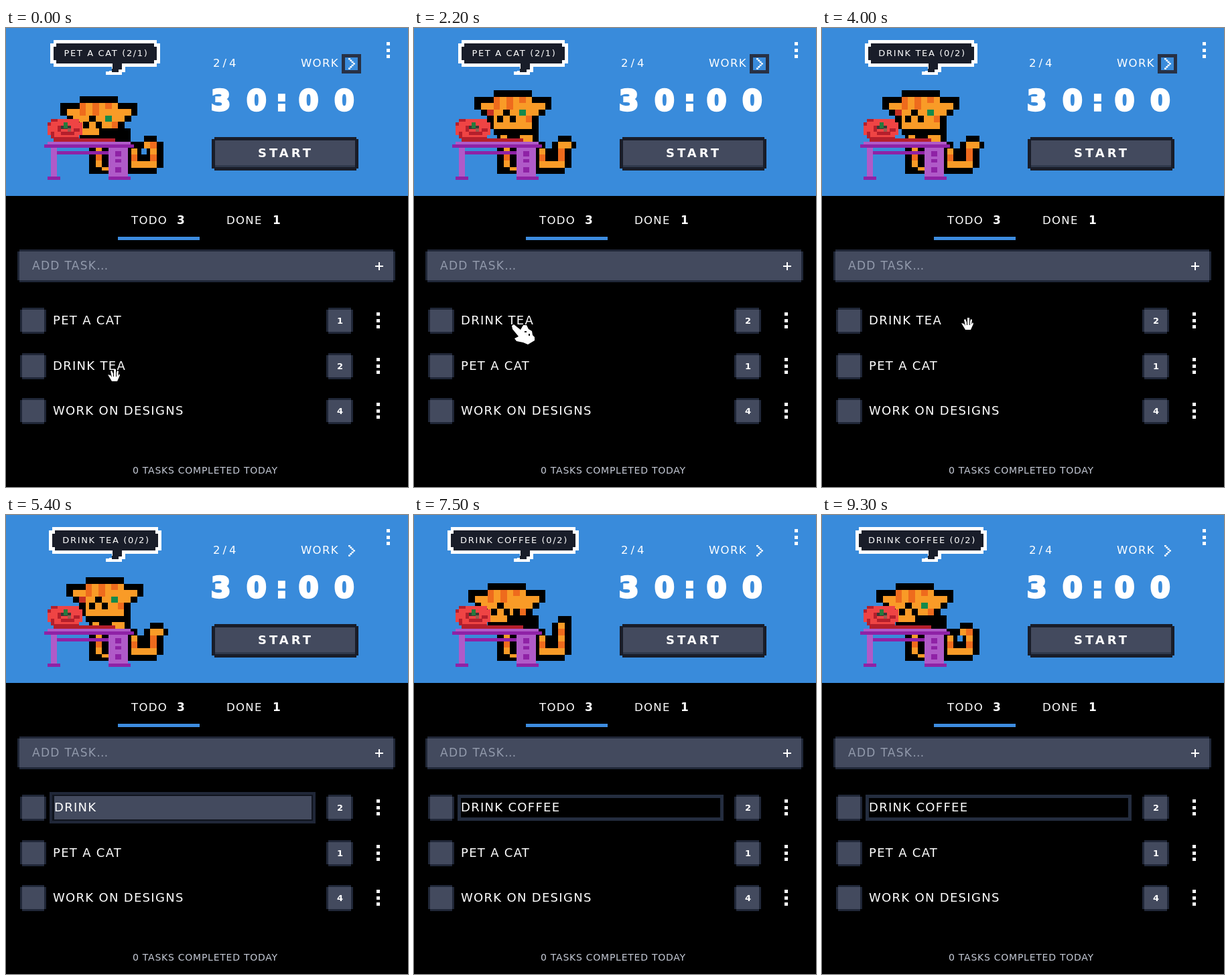
Write an HTML page with a canvas that moves like this. It is 600 px wide and 686 px high and loops after 9.4 s.

```html
<!DOCTYPE html>
<html lang="en">
<head>
<meta charset="utf-8">
<title>Pixel cat timer</title>
<style>
html, body { margin: 0; width: 100%; height: 100%; overflow: hidden; background: #000; }
canvas { display: block; }
</style>
</head>
<body>
<canvas id="stage" width="600" height="686"></canvas>
<script>
const ctx = document.getElementById('stage').getContext('2d');
const LOOP = 9400, STEP = 100;
const BLUE = '#398bdb', SLATE = '#434a5e', EDGE = '#202738', INK = '#191d29', WHITE = '#fff';
const ORANGE = '#f99b27', RUST = '#ee6b1d', RED = '#ef4444', DARK_RED = '#b51f2c';
const PURPLE = '#b05ac8', PLUM = '#8f22a6';
const ROWS = [437, 505, 572];

function box(color, x, y, w, h) {
  ctx.fillStyle = color;
  ctx.fillRect(x, y, w, h);
}

function text(str, x, baseline, { size = 18, gap = 1.3, color = WHITE, bold = false, align = 'left', outline = 0 } = {}) {
  ctx.font = `${bold ? 'bold ' : ''}${size}px "DejaVu Sans", sans-serif`;
  ctx.letterSpacing = gap + 'px';
  ctx.textAlign = align;
  ctx.fillStyle = ctx.strokeStyle = color;
  ctx.fillText(str, x, baseline);
  if (!outline) return;
  ctx.lineWidth = outline;
  ctx.strokeText(str, x, baseline);
}

function shape(color, points) {
  ctx.fillStyle = color;
  ctx.beginPath();
  points.forEach(([x, y]) => ctx.lineTo(x, y));
  ctx.fill();
}

const clamp = v => Math.min(1, Math.max(0, v));
const smooth = v => v * v * (3 - 2 * v);

// Reads a value from [time, value] keys with linear steps between them.
function track(keys, t) {
  const i = keys.findIndex(key => key[0] > t);
  if (i < 0) return keys[keys.length - 1][1];
  if (i === 0) return keys[0][1];
  const [t0, a] = keys[i - 1], [t1, b] = keys[i];
  return a + (b - a) * (t - t0) / (t1 - t0);
}

// Panel with notched pixel corners.
function panel(x, y, w, h, rim = 3) {
  box(EDGE, x + rim, y, w - 2 * rim, h);
  box(EDGE, x, y + rim, w, h - 2 * rim);
  box(SLATE, x + rim, y + rim, w - 2 * rim, h - 2 * rim);
}

function dots(x, y) {
  for (let i = 0; i < 3; i++) box(WHITE, x, Math.round(y + i * 9.5), 5, 5);
}

function bubble(t) {
  const [label, left] = t < 2400 ? ['PET A CAT (2/1)', 66]
    : t < 7000 ? ['DRINK TEA (0/2)', 64] : ['DRINK COFFEE (0/2)', 50];
  const w = 296 - 2 * left;
  box(WHITE, left + 5, 18, w - 10, 40);
  box(WHITE, left, 23, w, 30);
  box(WHITE, 154, 57, 24, 9);
  box(WHITE, 149, 65, 24, 5);
  box(INK, left + 9, 23, w - 18, 30);
  box(INK, left + 5, 28, w - 10, 20);
  box(BLUE, 153, 58, 5, 6);
  box(INK, 159, 53, 14, 9);
  box(INK, 158, 61, 10, 5);
  text(label, 149.5, 42, { size: 13, gap: 1.65, align: 'center' });
}

// Cat cells are placed on a 9.6 px grid.
function cells(color, x, y, col, row, w = 1, h = 1) {
  const u = 9.6, px = v => Math.round(v * u);
  box(color, x + px(col), y + px(row), px(col + w) - px(col), px(row + h) - px(row));
}

function tail(pose) {
  const cell = (color, ...at) => cells(color, 177, 151, ...at);
  // Haunch behind the desk.
  cell('#000', 0, 2, 2, 5);
  cell('#000', 2, 3, 1, 4);
  cell(ORANGE, 1, 3, 1, 3);
  cell(RUST, 1, 4);
  cell('#000', 2, 6, 3);
  if (pose === 'curl') {
    cell('#000', 3, 1, 2);
    cell('#000', 2, 2, 4, 4);
    cell(BLUE, 2.6, 3, 0.8);
    cell(ORANGE, 3, 2);
    cell(RUST, 4, 2);
    cell(ORANGE, 4, 3, 1, 3);
  } else {
    const top = pose === 'up' ? 0 : 1;
    cell('#000', 4, top, 2, 6 - top);
    cell('#000', 3, top + 1, 1, 5 - top);
    cell(ORANGE, 4, top + 1, 1, 5 - top);
    if (pose === 'bend') {
      cell('#000', 5, 2, 1.8);
      cell(ORANGE, 5, 2);
    }
    cell(RUST, 4, top + 2);
  }
  cell(RUST, 4, 4);
  cell(ORANGE, 2, 5, 2);
}

function body(awake) {
  box('#000', 124, 150, 62, 68);
  box(ORANGE, 134, 179, 9, 29);
  box(RUST, 134, 189, 9, 9);
  box(ORANGE, 143, 208, 11, 5);
  if (!awake) return;
  box(ORANGE, 129, 160, 10, 10);
  box(ORANGE, 158, 160, 19, 10);
  box(RUST, 139, 165, 19, 5);
}

function head(awake, blink) {
  const x = awake ? 90 : 81, y = awake ? 93 : 102;
  const cell = (color, ...at) => cells(color, x, y, ...at);
  cell('#000', 3, 0, 6);
  cell('#000', 0, 1, 12, 2);
  cell('#000', 1, 3, 10);
  cell('#000', 2, 4, 8, 2);
  cell('#000', 3, 6, 7);
  cell(ORANGE, 3, 1, 6);
  cell(ORANGE, 1, 2, 10);
  cell(ORANGE, 2, 3, 8);
  cell(ORANGE, 3, 4, 6);
  cell(ORANGE, 3, 5, awake ? 6 : 3);
  cell(RUST, 3, 1);
  cell(RUST, 5, 1);
  cell(RUST, 7, 1);
  cell(RUST, 3, 2);
  cell(RUST, 5, 2);
  cell(RUST, 8, 4);
  cell(awake ? '#c63123' : ORANGE, 2, 3);
  cell(blink ? ORANGE : '#148a4c', 7, 3);
  if (blink) cell('#000', 7, 4);
  cell('#000', 4.5, 3);
  cell('#000', 3.5, 4);
  cell('#000', 5.5, 4);
}

function desk() {
  box(DARK_RED, 71, 165, 92, 5);
  box(PURPLE, 62, 170, 124, 5);
  box(PLUM, 57, 174, 134, 5);
  box(PLUM, 76, 184, 78, 5);
  box(PURPLE, 67, 179, 9, 43);
  box(PLUM, 62, 222, 19, 5);
  box(PURPLE, 153, 179, 29, 43);
  box(PLUM, 153, 222, 33, 5);
  [184, 196, 208].forEach((y, i) => box(PLUM, 163, y, 9, i === 1 ? 5 : 8));
}

function tomato() {
  box(RED, 67, 136, 42, 29);
  box(RED, 62, 141, 52, 19);
  box(DARK_RED, 62, 141, 5, 5);
  box(DARK_RED, 67, 136, 10, 4);
  box(DARK_RED, 67, 155, 5, 10);
  box(DARK_RED, 72, 163, 37, 3);
  box(DARK_RED, 77, 146, 5, 9);
  box(DARK_RED, 82, 155, 20, 5);
  box(DARK_RED, 101, 150, 9, 5);
  box('#3c3834', 82, 146, 15, 5);
  box('#28793d', 86, 141, 6, 9);
  box('#9c5a4e', 92, 150, 5, 5);
}

function cat(t) {
  const awake = t >= 1700 && t < 6500;
  const pose = t < 500 || t >= 8400 ? 'curl' : t < 900 || t >= 6900 ? 'up' : 'bend';
  tail(pose);
  body(awake);
  head(awake, t >= 7200 && t < 7700);
  desk();
  tomato();
}

function timer(t) {
  text('2/4', 309, 58, { size: 16.5, gap: 4 });
  text('WORK', 440, 58, { size: 16.5 });
  if (t < 4600) {
    box('#283145', 501, 39, 29, 29);
    box(BLUE, 506, 44, 19, 19);
  }
  for (let i = 0; i < 7; i++) {
    box(WHITE, 511 + 2.3 * (3 - Math.abs(3 - i)), 45 + i * 2.4, 3, 2.4);
  }
  const digits = { size: 42, gap: 24, bold: true, outline: 3.5 };
  text('30', 306, 123, digits);
  text(':', 403, 123, digits);
  text('00', 437, 123, digits);
  box(INK, 311, 163, 212, 50);
  box(INK, 307, 166, 219, 44);
  box(SLATE, 312, 168, 209, 40);
  box('#30394c', 312, 205, 209, 3);
  text('START', 376, 193, { gap: 4, bold: true });
  dots(568, 21);
}

function tabs() {
  text('TODO', 187, 293, { size: 16.5 });
  text('3', 255, 293, { size: 17, bold: true });
  text('DONE', 329, 293, { size: 16.5 });
  text('1', 398, 293, { size: 17, bold: true });
  box('#3d8ce0', 167, 312, 122, 5);
}

function addField() {
  panel(17, 331, 564, 49);
  text('ADD TASK…', 39, 361, { size: 17, color: '#929aac' });
  box(WHITE, 551, 355, 12, 2);
  box(WHITE, 556, 350, 2, 12);
}

function task(label, count, y, dx = 0) {
  y = Math.round(y);
  panel(21 + dx, y - 19, 39, 39);
  panel(478 + dx, y - 19, 40, 39);
  text(label, 70 + dx, y + 6);
  text(count, 498.5 + dx, y + 5, { size: 13, gap: 0, bold: true, align: 'center' });
  dots(553 + dx, y - 12);
}

// Field text while the old word is erased and the new one typed.
function draft(t) {
  const erased = Math.floor(clamp((t - 5000) / 400) * 3);
  const typed = Math.floor(clamp((t - 5700) / 1000) * 6);
  return 'DRINK ' + 'TEA'.slice(0, 3 - erased) + 'COFFEE'.slice(0, typed);
}

function editor(t) {
  if (t < 7000) {
    box(EDGE, 65, 414, 397, 47);
    box('#10141e', 69, 418, 389, 39);
    box(SLATE, 72, 420, 384, 35);
    text(draft(t), 72, 443);
  } else {
    box('#242d3f', 65, 418, 397, 39);
    box('#000', 70, 423, 387, 29);
    text('DRINK COFFEE', 70, 443);
  }
}

function list(t, handY) {
  const dragging = t > 1000 && t < 2100;
  const swap = smooth(clamp((t - 1100) / 300));
  const drinkY = t <= 1000 ? ROWS[1] : dragging ? Math.max(ROWS[0], ROWS[1] + handY - 514) : ROWS[0];
  task('PET A CAT', '1', ROWS[0] + swap * (ROWS[1] - ROWS[0]));
  task(t < 4600 ? 'DRINK TEA' : '', '2', drinkY, dragging ? -1 : 0);
  task('WORK ON DESIGNS', '4', ROWS[2]);
  if (t >= 4600) editor(t);
}

function openHand(x, y) {
  ctx.save();
  ctx.translate(x, y);
  shape(WHITE, [[-9, -1], [-5, 0], [-3, 3], [-5, -6], [-3, -7], [0, 0], [0, -9], [3, -9],
    [3, 0], [5, -7], [7, -6], [6, 1], [8, -2], [9, 0], [5, 9], [-3, 9]]);
  box('#000', -1, -6, 1, 8);
  box('#000', 3, -6, 1, 8);
  ctx.restore();
}

function closedHand(x, y) {
  box('#000', x - 8, y - 7, 16, 15);
  box(WHITE, x - 4, y - 6, 9, 8);
  box(WHITE, x - 6, y - 2, 13, 5);
  box(WHITE, x - 4, y + 3, 9, 4);
  for (let i = -2; i < 5; i += 3) box('#000', x + i, y - 5, 1, 4);
}

function pointingHand(x, y) {
  ctx.save();
  ctx.translate(x, y);
  shape(WHITE, [[-17, -13], [-14, -15], [-4, -7], [0, -14], [5, -14], [8, -8], [13, -5],
    [14, 1], [17, 4], [17, 9], [7, 15], [0, 12], [-10, 10], [-13, 6], [-7, 3], [-16, -8]]);
  box('#000', 2, -5, 3, 2);
  box('#000', 8, -1, 2, 3);
  ctx.restore();
}

function draw(t) {
  const handX = track([[0, 161], [1000, 148], [1200, 147], [2100, 147], [2200, 163], [2900, 163], [4000, 217]], t);
  const handY = track([[0, 519], [1000, 514], [1200, 469], [1500, 446], [2100, 446], [2200, 458], [2900, 458], [4000, 442]], t);
  box('#000', 0, 0, 600, 686);
  box(BLUE, 0, 0, 600, 251);
  bubble(t);
  cat(t);
  timer(t);
  tabs();
  addField();
  list(t, handY);
  text('0 TASKS COMPLETED TODAY', 189, 666, { size: 14, gap: 0.75, color: '#c5cad6' });
  if (t >= 4600) return;
  const hand = t <= 1000 || t >= 2900 ? openHand : t < 2100 ? closedHand : pointingHand;
  hand(Math.round(handX), Math.round(handY));
}

const start = performance.now();
function frame() {
  const t = (performance.now() - start) % LOOP;
  draw(Math.floor(t / STEP) * STEP);
  requestAnimationFrame(frame);
}
frame();
</script>
</body>
</html>
```
